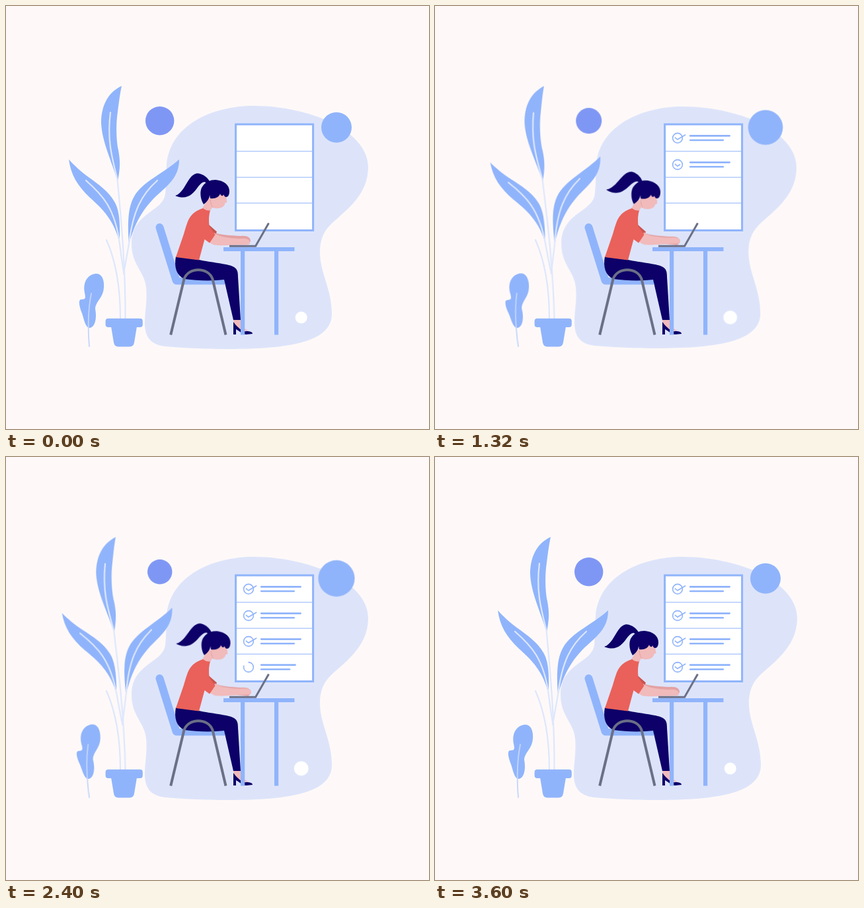
Recreate the animation shown at these times as an HTML page. Size 640 by 640 pixels, loop 3660 ms.

```html
<!DOCTYPE html>
<html lang="en">
<head>
<meta charset="utf-8">
<title>Checklist at the desk</title>
<style>
  html, body { margin: 0; width: 100%; height: 100%; overflow: hidden; background: #fef9f8; }
  svg { display: block; width: 100vw; height: 100vh; }

  .blue { fill: #90b4fb; }
  .navy { fill: #0d0068; }
  .skin { fill: #f1babb; }
  .shade { fill: #e3a2a3; }
  .line { fill: none; stroke-linecap: round; stroke-linejoin: round; }
  .rib { stroke: #dde7fd; stroke-width: 2.2; }
  .steel { stroke: #6b7086; }
  .row { stroke: #90b4fb; stroke-width: 2.6; stroke-dasharray: 1 2; stroke-dashoffset: 1.05; }
  .mark { stroke-width: 1.6; }

  .move { animation: 3660ms cubic-bezier(.37, 0, .63, 1) infinite; }
  .sway { animation-name: sway; }
  .pulse { animation-name: pulse; }
  .breathe { animation-name: breathe; transform-origin: 369px 335px; }
  .nod { animation-name: nod; }

  @keyframes sway {
    0%, 98.36%, 100% { transform: rotate(0deg); }
    49.18% { transform: rotate(var(--a)); }
  }
  @keyframes pulse {
    0%, 49.18%, 98.36%, 100% { transform: scale(1); }
    24.59%, 73.77% { transform: scale(var(--s)); }
  }
  @keyframes breathe {
    0%, 49.18%, 100% { transform: scale(1); }
    24.59% { transform: scale(.989); }
  }
  @keyframes nod {
    0%, 8.2%, 73.77%, 100% { transform: rotate(0deg); }
    24.59%, 57.38% { transform: rotate(var(--a)); }
  }
</style>
</head>
<body>
<svg viewBox="0 0 640 640">
  <path class="move breathe" fill="#dde4fa" d="M375 151C420 151 460 162 486 173C522 190 548 214 548 244C548 290 507 314 490 332C479 343 475 357 475 372C475 404 493 428 493 466C493 508 430 519 336 519C300 519 262 517 240 515C218 512 210 500 210 480C210 462 214 446 212 426C210 402 190 392 190 360C190 312 238 312 241 284C243 266 242 254 243 240C248 180 312 151 375 151Z"/>

  <circle class="move pulse" style="--s:.816;transform-origin:232.7px 173.7px" cx="232.7" cy="173.7" r="21.7" fill="#7f97f4"/>
  <circle class="move pulse" style="--s:1.261;transform-origin:500px 183.7px" cx="500" cy="183.7" r="23" fill="#90b4fb"/>
  <circle class="move pulse" style="--s:1.27;transform-origin:446.7px 471.3px" cx="446.7" cy="471.3" r="9" fill="#fff"/>

  <!-- board -->
  <rect x="347.6" y="179" width="117" height="160.5" fill="#fff"/>
  <path d="M348 219.8H464M348 259.2H464M348 298.3H464" stroke="#b4cbfb" stroke-width="1.4"/>
  <rect x="347.6" y="179" width="117" height="160.5" fill="none" stroke="#90b4fb" stroke-width="3"/>
  <g id="rows"></g>

  <!-- plant -->
  <path class="line rib" d="M173 473C173 430 168 390 152 354"/>
  <g class="move sway" style="--a:-1.96deg;transform-origin:178px 472px">
    <path class="blue" d="M175 121C155 130 144 150 144 177C145 205 160 235 169 265C173 245 173 235 170 218C167 205 166 180 169 160C171 145 172 135 175 121Z"/>
    <path class="line rib" d="M180.5 473C181 400 175 330 168.5 262C159 225 153 200 158 161"/>
  </g>
  <g class="move sway" style="--a:-3.7deg;transform-origin:174px 448px">
    <path class="blue" d="M95 232C98 255 108 272 127 290C145 306 165 325 172 360C172 340 174 312 164 296C155 280 140 270 125 259C113 250 104 242 95 232Z"/>
    <path class="blue" d="M262 232C262 250 255 262 240 276C222 292 200 310 186 360C184 330 184 305 194 288C207 265 238 254 262 232Z"/>
    <path class="line rib" d="M121 264C145 285 165 305 172 360C174 376 176 390 178 402M229 264C205 285 192 310 186 360L178 405"/>
  </g>
  <g class="move sway" style="--a:-4.5deg;transform-origin:126px 515px">
    <path class="blue" d="M135 405C145 404 149 414 148 426C147 442 136 446 135 458C138 474 134 487 126 487C120 486 118 474 115 465C111 455 109 446 113 444C120 444 121 443 119 434C116 420 122 407 135 405Z"/>
    <path class="line" stroke="#c3d5fc" stroke-width="1.8" d="M126 515C124 490 124 460 129 435"/>
  </g>
  <rect class="blue" x="150.6" y="472.7" width="56.2" height="13.3" rx="4"/>
  <path class="blue" d="M159 485H198L194 509Q193 515.5 187 515.5H170Q164 515.5 163 509Z"/>

  <!-- chair, legs and shoe -->
  <path class="line" stroke="#90b4fb" stroke-width="12" d="M232.5 335L257.5 415"/>
  <path class="blue" d="M252 411H331V421.5H258Q254 421.5 252 416Z"/>
  <path class="skin" d="M344 474H355L357 485L367 492L352 490L345 481Z"/>
  <path class="navy" d="M344 478L348 483C353 488 358 493 364 492C369 492 373 493 373 496L363 497C357 496 352 491 348 489V497H344Z"/>
  <path class="navy" d="M257 379L292 384C310 388 335 390 343 394C350 397 351 402 351 410L355 475H344L330 414C315 416 290 416 270 413C258 408 254 395 257 379Z"/>
  <path class="line steel" stroke-width="4" style="stroke-linecap:butt" d="M249.2 497.5L269.5 413C276 394.5 306 394.5 312.5 413L332.5 497.5"/>

  <!-- upper body -->
  <g id="backArm" style="transform-origin:314px 346px">
    <path class="shade" d="M314 342C325 347 340 347 355 348C365 347 370 350 370 356L366 361L330 357L312 350Z"/>
  </g>
  <path fill="#c85450" d="M307 331L319 341.5L316 348L307 343Z"/>
  <g id="frontArm" style="transform-origin:312px 352px">
    <path class="skin" d="M315 343C322 350 340 351 352 352C362 351 368 352 369 357C370 361 367 361.5 355 361.5C340 361.5 325 363 315 361.5C311 360 309 359 306 356Z"/>
  </g>
  <path class="skin" d="M307 289L299 303C295 307 297 311 304 313C310 312 309 307 314 303Z"/>
  <path fill="#e9615a" d="M298 306Q281 311 275 326Q272 334 269 345L257 380L292 384.5L300.5 353L308 358.5L316.5 346L307.5 333Q306 318 309 309.5Q303 310 298 306Z"/>

  <g class="move nod" style="--a:4.3deg;transform-origin:306px 322px">
    <path class="skin" d="M308 281H332L334.5 297L331.5 298C331 304 324 307 316 306L309 303Z"/>
    <path class="line" stroke="#e3a2a3" d="M309 293Q310 301 313 305"/>
    <path class="navy move nod" style="--a:6.3deg;transform-origin:306px 282px" d="M256 287C266 284 271 271 278 261C283 254 289 252 294 254C301 256 306 261 309 267L303 268C300 264 296 267 291 273C282 286 273 294 256 287Z"/>
    <path class="navy" d="M299 300C294 292 293 282 296 275C301 266 309 263 317 263C330 264 338 271 338 280C338 286 336 289 333 289C331 289 330 287 329 285C329 288 325 288 324 284C322 289 317 292 309 291L308 286C308 291 304 297 299 300Z"/>
  </g>

  <!-- desk and laptop -->
  <path class="blue" d="M329 365H436.5V371H412.2V497.5H406V371H361.2V497.5H355V371H329Z"/>
  <path class="line steel" stroke-width="3" style="stroke-linecap:butt;stroke-linejoin:miter" d="M338 363.3H377.6L397.5 328.5"/>
</svg>
<script>
  const LOOP = 3660, STEP = 600, TYPE = 360;
  const rows = document.getElementById('rows');

  const play = (el, frames, easing = 'linear') => el.animate(
    frames.map(([t, style]) => ({ offset: t / LOOP, easing, ...style })),
    { duration: LOOP, iterations: Infinity });

  // Draws a stroke along [time, fraction] points.
  function draw(d, cls, points) {
    const path = document.createElementNS('http://www.w3.org/2000/svg', 'path');
    path.setAttribute('d', d);
    path.setAttribute('class', 'line row ' + cls);
    path.setAttribute('pathLength', 1);
    rows.append(path);
    const first = points[0][0];
    play(path, [[0, 0], [first, 0], ...points.slice(1), [LOOP, 1]]
      .map(([t, k]) => [t, { strokeDashoffset: 1.05 * (1 - k) }]));
  }

  [199.8, 240, 279, 318].forEach((y, i) => {
    const at = (...points) => points.map(([t, k]) => [t + i * STEP, k]);
    const bar = at([380, 0], [420, .31], [450, .5], [600, .87], [700, 1]);
    draw(`M367 ${y - 7.4}a7.4 7.4 0 0 1 0 14.8a7.4 7.4 0 0 1 0 -14.8`, 'mark', at([382, 0], [655, 1]));
    draw(`M363.3 ${y - .6}l3.4 2.8l12 -7`, 'mark', at([660, 0], [780, 1]));
    draw(`M386.2 ${y - 3.4}H445.6`, '', bar);
    draw(`M386.2 ${y + 3.2}H435.8`, '', bar);
  });

  // Seven keystrokes, then the hands rest.
  function type(id, pose) {
    const rest = { transform: 'translate(0px, 0px) rotate(0deg)' };
    const frames = [];
    for (let n = 0; n < 7; n++) {
      frames.push([n * TYPE, rest], [(n + .5) * TYPE, { transform: pose }]);
    }
    play(document.getElementById(id), [...frames, [7 * TYPE, rest], [LOOP, rest]], 'ease-in-out');
  }
  type('frontArm', 'translate(2px, -.5px) rotate(-2deg)');
  type('backArm', 'translate(1px, .5px) rotate(1deg)');
</script>
</body>
</html>
```
